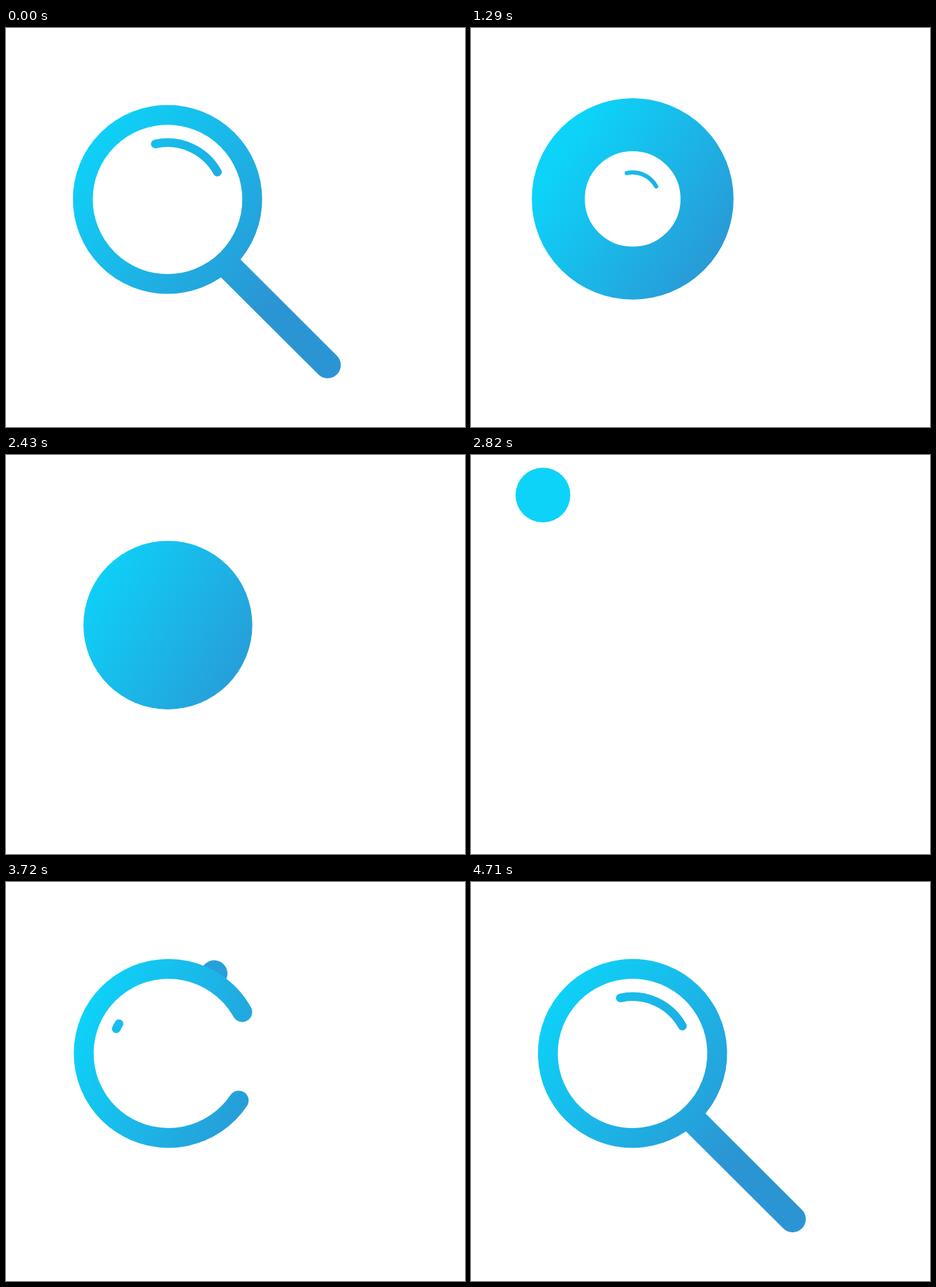
Write an HTML page with a canvas that moves like this. It is 659 by 574 pixels and loops after 4740 ms.

```html
<!DOCTYPE html>
<html>
<head>
<meta charset="utf-8">
<style>
  html, body { margin: 0; width: 100%; height: 100%; overflow: hidden; background: #fff; }
  canvas { display: block; }
</style>
</head>
<body>
<canvas id="stage" width="659" height="574"></canvas>
<script>
const ctx = document.getElementById('stage').getContext('2d');
const LOOP = 4740, STEP = 30;
const CX = 231.9, CY = 246.6;
const RING = 121.6, STROKE = 28.5, DISC = 121.25;
const HANDLE = { angle: 45, length: 331, base: 131, width: 38, offset: 6 };
const SHINE = { radius: 81.7, width: 12.5, from: -102.4, to: -28.8 };

// Gradient direction in degrees, then its start and end relative to the centre.
const GLASS = [38, -150, 210], FILLED = [30, -85, 115], FLAT = [30, -140, 170], HOOP = [25, -140, 175];

const rad = deg => deg * Math.PI / 180;
const mix = (a, b, p) => a + (b - a) * p;
const ramp = (t, from, to) => Math.min(1, Math.max(0, (t - from) / (to - from)));
const smooth = (t, from, to) => {
  const p = ramp(t, from, to);
  return p * p * (3 - 2 * p);
};
const bump = (t, from, to) => Math.sin(Math.PI * ramp(t, from, to));

function bezier(p, a, b, c, d) {
  const q = 1 - p;
  return q * q * q * a + 3 * q * q * p * b + 3 * q * p * p * c + p * p * p * d;
}

function gradient(x0, y0, x1, y1, from = '#0dd3f9', to = '#2b95d3') {
  const g = ctx.createLinearGradient(x0, y0, x1, y1);
  g.addColorStop(0, from);
  g.addColorStop(1, to);
  return g;
}

function bodyPaint(t) {
  const blend = (a, b, p) => a.map((v, i) => mix(v, b[i], p));
  let pose = blend(GLASS, FILLED, smooth(t, 1110, 1500));
  pose = blend(pose, FLAT, smooth(t, 1500, 1740));
  pose = blend(pose, HOOP, smooth(t, 2940, 3480));
  const [angle, start, end] = blend(pose, GLASS, smooth(t, 3720, 4500));
  const c = Math.cos(rad(angle)), s = Math.sin(rad(angle));
  return gradient(CX + c * start, CY + s * start, CX + c * end, CY + s * end);
}

function disc(x, y, r, paint) {
  ctx.fillStyle = paint;
  ctx.beginPath();
  ctx.arc(x, y, r, 0, 2 * Math.PI);
  ctx.fill();
}

function arc(x, y, r, from, to, width, paint) {
  ctx.strokeStyle = paint;
  ctx.lineWidth = width;
  ctx.beginPath();
  ctx.arc(x, y, r, rad(from), rad(to));
  ctx.stroke();
}

function handle(angle, length) {
  const { base, width, offset } = HANDLE;
  ctx.save();
  ctx.translate(CX, CY);
  ctx.rotate(rad(angle));
  ctx.strokeStyle = gradient(GLASS[1], 0, GLASS[2], 0);
  ctx.lineWidth = width;
  ctx.beginPath();
  ctx.moveTo(base, offset);
  ctx.lineTo(Math.max(length, base + 0.1), offset);
  ctx.stroke();
  ctx.restore();
}

function shine(from, to, scale = 1) {
  ctx.save();
  ctx.translate(CX, CY);
  ctx.scale(scale, scale);
  const paint = gradient(-18, -60, 72, -40, '#17bdec', '#1eb0e4');
  arc(0, 0, SHINE.radius, from, Math.max(to, from + 0.1), SHINE.width, paint);
  ctx.restore();
}

// The handle stretches a little, snaps in, and the ring swells shut into a disc.
function collapse(t, paint) {
  const p = ramp(t, 600, 1290);
  const pull = Math.pow(p, 4.2) * (3.03 * p - 2.03);
  if (p < 1) handle(HANDLE.angle, HANDLE.length - 216 * pull);

  const scale = 1 - Math.pow(ramp(t, 1000, 1400), 2);
  if (scale > 0) shine(SHINE.from, SHINE.to, scale);

  const outer = mix(RING + STROKE / 2, DISC, smooth(t, 1110, 1680)) + 12.5 * bump(t, 1110, 1500);
  const inner = (RING - STROKE / 2) * (1 - smooth(t, 1140, 1510));
  const y = mix(CY, 245, smooth(t, 1110, 1500));
  arc(mix(CX, 232.4, smooth(t, 1110, 1500)), y, (outer + inner) / 2, 0, 360, outer - inner, paint);
}

// The disc dips, then arcs up to the left while it shrinks.
function fly(t, paint) {
  const p = smooth(t, 2520, 2940) - 0.005 * bump(t, 2430, 2520);
  const x = bezier(p, 232.4, 200, 102.7, 84);
  const y = bezier(p, 244.7, 0, 42, 77);
  disc(x, y, mix(DISC, 19.1, p), paint);
}

// The dot spirals in and draws the ring; the handle and shine swing out with one easing.
function orbit(t, paint) {
  const TAIL = 209.3;
  const turn = mix(-49, TAIL + 360.7, smooth(t, 2940, 3914));
  const far = Math.pow(1 - ramp(t, 2940, 3240), 2);
  const x = CX + 4 * Math.pow(1 - ramp(t, 3480, 4020), 2);

  if (t >= 3690) {
    const rest = Math.pow(1 - Math.pow(ramp(t, 3680, 4580), 1.3), 7.5);
    handle(HANDLE.angle - 122.5 * rest, HANDLE.length - 226 * rest);
    shine(SHINE.from - 59.2 * rest, SHINE.to - 136.6 * rest);
  }
  if (turn < TAIL) {
    const a = rad(180 - turn), r = RING + 103.4 * far;
    disc(x + r * Math.cos(a), CY + r * Math.sin(a), STROKE / 2 + 4.8 * far, paint);
  } else {
    const sweep = Math.min(turn - TAIL, 360);
    arc(x, CY, RING, 180 - TAIL - sweep, 180 - TAIL, STROKE, paint);
  }
}

function draw(t) {
  ctx.fillStyle = '#fff';
  ctx.fillRect(0, 0, 659, 574);
  ctx.lineCap = 'round';
  const scene = t < 1740 ? collapse : t < 2940 ? fly : orbit;
  scene(t, bodyPaint(t));
}

const begin = performance.now();
function tick() {
  const t = (performance.now() - begin) % LOOP;
  draw(Math.floor(t / STEP) * STEP);
  requestAnimationFrame(tick);
}
tick();
</script>
</body>
</html>
```
